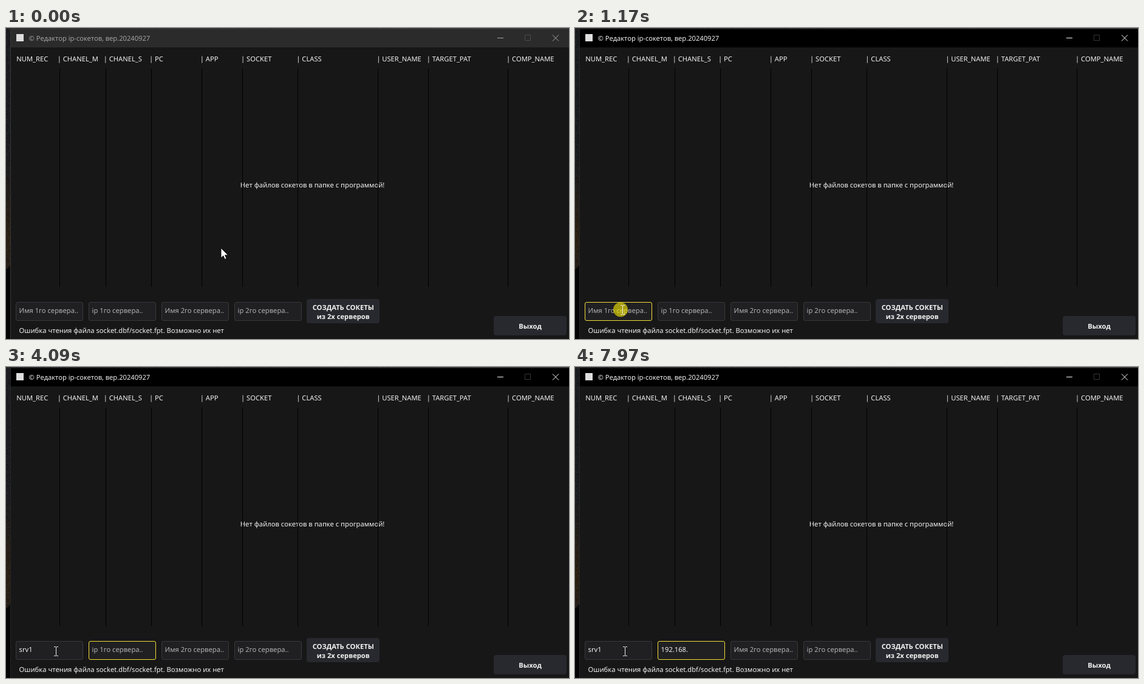
Recreate the animation shown at these times as an HTML page with a canvas. Size 927 px wide and 513 px high, loop 8 s.

```html
<!DOCTYPE html>
<html lang="ru">
<head>
<meta charset="utf-8">
<style>
  html, body { margin: 0; width: 100%; height: 100%; overflow: hidden; background: #0a0a0a; }
  canvas, svg { position: absolute; left: 0; top: 0; display: block; }
  text { font: 11.2px "Noto Sans", "Open Sans", sans-serif; fill: #f3f3f3; white-space: pre; text-rendering: geometricPrecision; }
  .title { font: 11.18px "Open Sans", "Noto Sans", sans-serif; }
  .bold { font-weight: 700; text-anchor: middle; }
  .hint { fill: #b2b2b2; }
</style>
</head>
<body>
<canvas id="desk" width="927" height="513"></canvas>
<svg id="stage" width="927" height="513" viewBox="0 0 927 513"></svg>
<script>
const LOOP = 8000;
const YELLOW = '#f4de37';
const stage = document.getElementById('stage');

function add(tag, attrs, text) {
  const el = document.createElementNS('http://www.w3.org/2000/svg', tag);
  for (const k in attrs) el.setAttribute(k, attrs[k]);
  if (text) el.textContent = text;
  return stage.appendChild(el);
}
const box = (x, y, width, height, fill, rx = 0) => add('rect', { x, y, width, height, fill, rx });
const label = (x, y, text, cls = '') => add('text', { x, y, class: cls }, text);
const show = (el, on) => el.setAttribute('visibility', on ? 'visible' : 'hidden');

// Grainy desktop around the window
const ctx = document.getElementById('desk').getContext('2d');
let seed = 7;
const rnd = () => (seed = seed * 16807 % 2147483647) / 2147483647;
function grain(w, h, tone) {
  for (let y = 0; y < h; y++) for (let x = 0; x < w; x++) {
    const [r, g, b] = tone(x, y), n = (rnd() - 0.5) * 18;
    ctx.fillStyle = `rgb(${r + n | 0},${g + n | 0},${b + n | 0})`;
    ctx.fillRect(x, y, 1, 1);
  }
}
ctx.fillStyle = '#050505';
ctx.fillRect(0, 0, 927, 513);
grain(8, 398, (x, y) => {
  if (y > 390 && x > 397 - y) return [9, 9, 9];
  const warm = Math.max(0, 1 - Math.abs(y - 345) / 130);
  return [27 + 16 * warm, 28 + 4 * warm, 31 - 12 * warm];
});
grain(927, 2, x => Array(3).fill(42 + 28 * x / 927));

// Window
const frame = add('rect', { x: 7.5, y: 1.5, width: 930, height: 530, fill: '#171718', stroke: '#383838' });
const bar = box(8, 2, 919, 30, '#2b2b2b');
box(17, 10, 12, 12, '#dedede');
const title = label(37.5, 21, '© Редактор ip-сокетов, вер.20240927', 'title');
const line = d => add('path', { d, fill: 'none', stroke: '#aaa' });
const controls = [line('M809 16.5h10'), line('M900 11.5l10 10M910 11.5l-10 10')];
const maxBox = line('M854.5 11.5h9v9h-9z');

label(17.3, 55, 'NUM_REC');
const columns = [
  [84.7, 'CHANEL_M'], [160.7, 'CHANEL_S'], [236, 'PC'], [319.7, 'APP'], [387, 'SOCKET'],
  [478.3, 'CLASS'], [610.2, 'USER_NAME'], [692.7, 'TARGET_PAT'], [824, 'COMP_NAME']
];
for (const [x, name] of columns) label(x, 55, '| ' + name);
label(385.8, 263, 'Нет файлов сокетов в папке с программой!');
for (const x of [88, 164, 239, 322, 389, 480, 612, 695, 826]) box(x, 67, 1, 360, '#000');

// Entries and buttons
const entries = ['Имя 1го сервера..', 'ip 1го сервера..', 'Имя 2го сервера..', 'ip 2го сервера..'].map((hint, i) => {
  const x = 16 + 120 * i;
  const edge = box(x + 0.5, 452.5, 110, 30, '#202023', 2.5);
  return { x: x + 5.6, hint, edge, text: label(x + 5.6, 470, hint, 'hint') };
});
box(495, 447, 120, 40, '#28292e', 4);
label(555.3, 465, 'СОЗДАТЬ СОКЕТЫ', 'bold');
label(555.3, 480, 'из 2х серверов', 'bold');
box(803, 475, 120, 32, '#28292e', 4);
label(863, 496, 'Выход', 'bold');
label(21.6, 503, 'Ошибка чтения файла socket.dbf/socket.fpt. Возможно их нет');

const caret = box(21, 458, 1, 15, YELLOW);
const click = add('circle', { cx: 75, cy: 464.5, r: 12, fill: '#fff000' });
const arrow = add('path', { d: 'M0 0V16.2L3.8 12.7L6.4 18.4L9 17.3L6.5 11.7H11.6Z', fill: '#fff', stroke: '#000', 'stroke-width': 0.8 });
const beam = add('path', { d: 'M-3.5 -7.5H-.5M.5 -7.5H3.5M0 -7V7M-3.5 7.5H-.5M.5 7.5H3.5', fill: 'none', stroke: '#eee' });

// Steps: [time, value]
const FOCUS_AT = 1170, TAB_AT = 4090;
const typed = [
  [[0, ''], [2535, 's'], [2630, 'sr'], [2900, 'srv'], [3100, 'srv1']],
  [[0, ''], [5340, '1'], [5490, '19'], [5540, '192'], [6040, '192.'], [6290, '192.1'],
   [7040, '192.16'], [7450, '192.168'], [7550, '192.168.']]
];
const blink = [
  [0, 0], [1360, 1], [1880, 0.5], [1950, 0], [2440, 1], [3440, 0.5], [3630, 0], [4280, 1], [4780, 0.5],
  [4820, 0], [5340, 1], [5890, 0.5], [6040, 1], [6640, 0.5], [6840, 0], [7040, 1], [7360, 0.5], [7450, 1], [7970, 0]
];
const mouse = [
  [180, 354, 363], [250, 340, 378], [380, 285, 425], [510, 210, 457], [640, 150, 474],
  [770, 115, 482], [880, 92, 475], [970, 78, 465], [1400, 78, 465], [1670, 82, 469]
];
const stepAt = (steps, t) => steps.filter(s => s[0] <= t).pop()[1];

function mouseAt(t) {
  const last = mouse[mouse.length - 1];
  if (t < 180) return mouse[0].slice(1);
  if (t >= last[0]) return last.slice(1);
  // The pointer is sampled about 15 times a second
  const q = Math.min(last[0], 180 + (Math.floor((t - 180) / 66) + 1) * 66);
  const i = Math.max(1, mouse.findIndex(p => p[0] >= q));
  const [t0, x0, y0] = mouse[i - 1], [t1, x1, y1] = mouse[i];
  const k = (q - t0) / (t1 - t0);
  return [Math.round(x0 + (x1 - x0) * k), Math.round(y0 + (y1 - y0) * k)];
}

function render(t) {
  const active = t >= FOCUS_AT;
  bar.setAttribute('fill', active ? '#000' : '#2b2b2b');
  frame.setAttribute('stroke', active ? '#262626' : '#383838');
  title.style.fill = active ? '#fff' : '#aaa';
  for (const c of controls) c.setAttribute('stroke', active ? '#fff' : '#aaa');
  maxBox.setAttribute('stroke', active ? '#363636' : '#4b4b4b');

  const focus = !active ? -1 : t < TAB_AT ? 0 : 1;
  entries.forEach((e, i) => {
    const value = typed[i] ? stepAt(typed[i], t) : '';
    const text = value || e.hint;
    if (e.text.textContent !== text) e.text.textContent = text;
    e.text.setAttribute('class', value ? '' : 'hint');
    e.edge.setAttribute('stroke', i === focus ? YELLOW : '#39393a');
    if (i === focus) {
      const w = value ? e.text.getComputedTextLength() : 0;
      caret.setAttribute('x', Math.floor(e.x + w));
    }
  });
  caret.setAttribute('opacity', stepAt(blink, t));

  show(click, active && t < 1600);
  click.setAttribute('opacity', 0.6 * Math.min(1, Math.max(0, (1600 - t) / 300)));

  const [x, y] = mouseAt(t);
  const overEntry = y >= 452 && y <= 483 && x >= 16 && x < 487 && (x - 16) % 120 < 111;
  show(arrow, !overEntry);
  show(beam, overEntry);
  (overEntry ? beam : arrow).setAttribute('transform', `translate(${x + (overEntry ? 0.5 : 0)} ${y})`);
}

const start = performance.now();
function tick() {
  render((performance.now() - start) % LOOP);
  requestAnimationFrame(tick);
}
tick();
</script>
</body>
</html>
```
